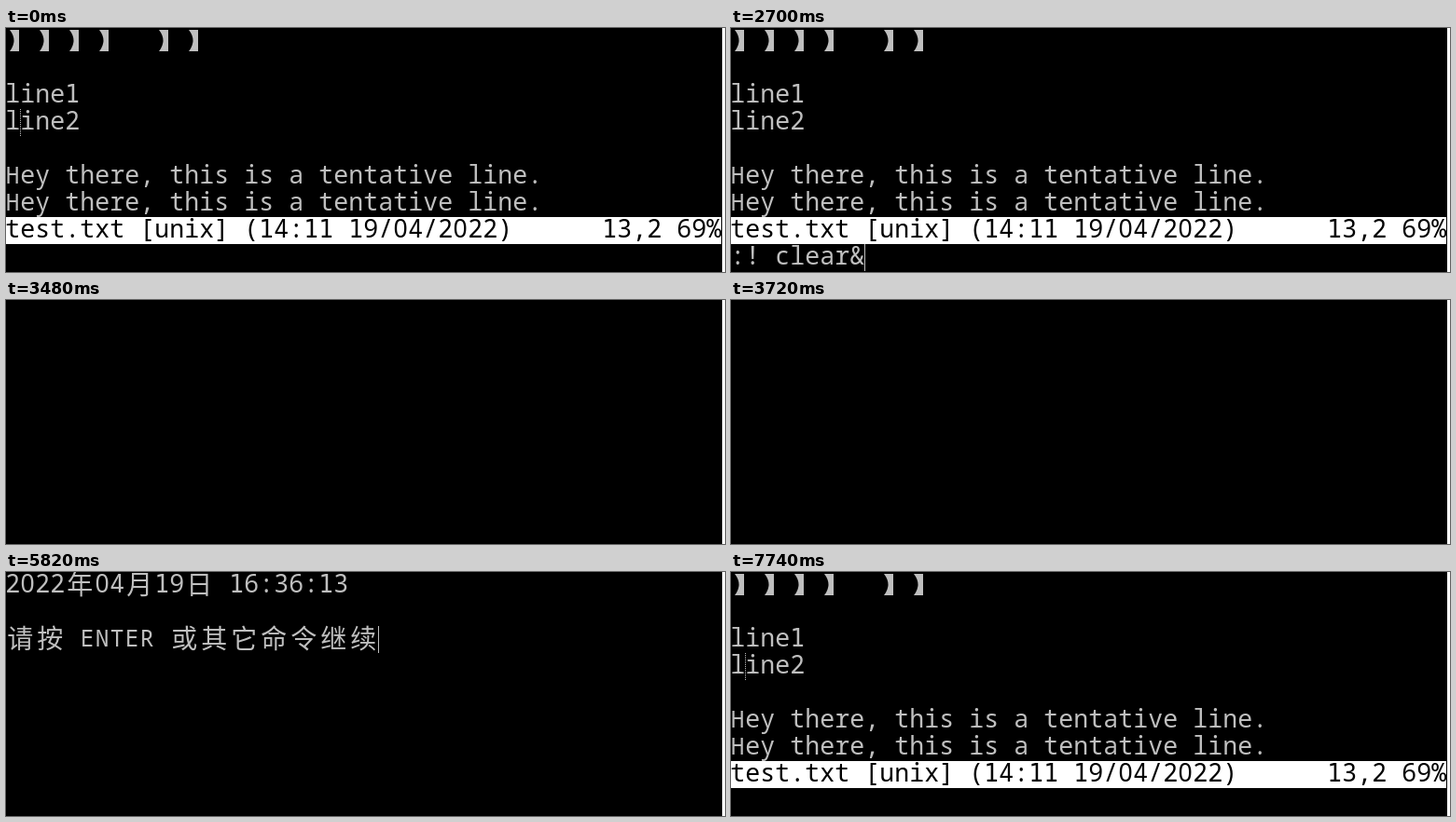
An HTML page with a canvas that plays this animation: 771x262 px, repeating every 7.8 s.

```html
<!DOCTYPE html>
<html lang="en">
<head>
<meta charset="utf-8">
<title>Terminal editor running a shell command</title>
<style>
  html, body { margin: 0; width: 100%; height: 100%; overflow: hidden; background: #000; }
  canvas { display: block; }
</style>
</head>
<body>
<canvas id="screen" width="771" height="262"></canvas>
<script>
const ctx = document.getElementById('screen').getContext('2d');
const LOOP = 7800, CELL = 16, ROW = 29, BASELINE = 22;
const GREY = '#bfbfbf';
const MONO = '26.6px "Noto Sans Mono", monospace';
const CAPITAL = '500 24.5px "Noto Sans Mono", monospace';
const FOOTED_ONE = '26px "DejaVu Sans Mono", monospace';
const PLAIN_ZERO = '26.6px "Noto Sans", sans-serif';
const HAN = '300 28px "Noto Sans CJK SC", "Noto Sans CJK", sans-serif';

const COMMAND = ':! clear&&date';
const KEY_TIMES = [720, 1080, 1320, 1740, 1860, 1920, 2100, 2220, 2700, 2880, 3060, 3180, 3240, 3360];
const SHOW_KEY = 660, RUN = 3480, OUTPUT = 3780, BACK = 6300;

function fontFor(char) {
  if (char > '~') return HAN;
  if (char === '0') return PLAIN_ZERO;
  if (char === '1') return FOOTED_ONE;
  return /[A-Z]/.test(char) ? CAPITAL : MONO;
}

// Each character sits in one cell; Chinese characters take two.
function write(text, row, col = 0, color = GREY) {
  ctx.fillStyle = color;
  ctx.textAlign = 'center';
  for (const char of text) {
    const wide = char > '~';
    const span = wide ? 2 : 1;
    ctx.font = fontFor(char);
    ctx.fillText(char, (col + span / 2) * CELL - 0.8, row * ROW + BASELINE + (wide ? 2 : 0));
    col += span;
  }
}

function cursor(row, col, dotted = false) {
  ctx.fillStyle = GREY;
  for (let y = 0; y < ROW; y += dotted ? 2 : 1) ctx.fillRect(col * CELL - 1, row * ROW + y, 1, 1);
}

function bracket(col) {
  const x = col * CELL;
  ctx.fillStyle = GREY;
  ctx.beginPath();
  ctx.moveTo(x + 4, 2);
  ctx.lineTo(x + 14, 2);
  ctx.lineTo(x + 14, 25);
  ctx.lineTo(x + 4, 25);
  ctx.quadraticCurveTo(x + 13, 13.5, x + 4, 2);
  ctx.fill();
}

function drawEditor(t) {
  [0, 2, 4, 6, 10, 12].forEach(bracket);
  write('line1', 2);
  write('line2', 3);
  write('Hey there, this is a tentative line.', 5);
  write('Hey there, this is a tentative line.', 6);
  ctx.fillStyle = '#fff';
  ctx.fillRect(0, 7 * ROW, 767, ROW);
  write('test.txt [unix] (14:11 19/04/2022)', 7, 0, '#000');
  write('13,2 69%', 7, 40, '#000');

  if (t >= SHOW_KEY && t < RUN) {
    const typed = KEY_TIMES.filter(time => time <= t).length;
    if (typed) {
      write(COMMAND.slice(0, typed), 8);
      cursor(8, typed);
    } else {
      write(':', 8, 37);
    }
  } else if (t < 6840 || t >= 7320) {
    cursor(3, 1, t < 180 || t >= 7740);
  }
}

function drawOutput(t) {
  write('2022年04月19日 16:36:13', 0);
  write('请按 ENTER 或其它命令继续', 2);
  const hidden = (t >= 4260 && t < 4800) || (t >= 5280 && t < 5820);
  if (!hidden) cursor(2, 25);
}

function frame(now) {
  const t = now % LOOP;
  ctx.fillStyle = '#000';
  ctx.fillRect(0, 0, 768, 262);
  ctx.fillStyle = '#fff';
  ctx.fillRect(768, 0, 3, 262);
  if (t < RUN || t >= BACK) drawEditor(t);
  else if (t >= OUTPUT) drawOutput(t);
  requestAnimationFrame(frame);
}
frame(performance.now());
</script>
</body>
</html>
```
